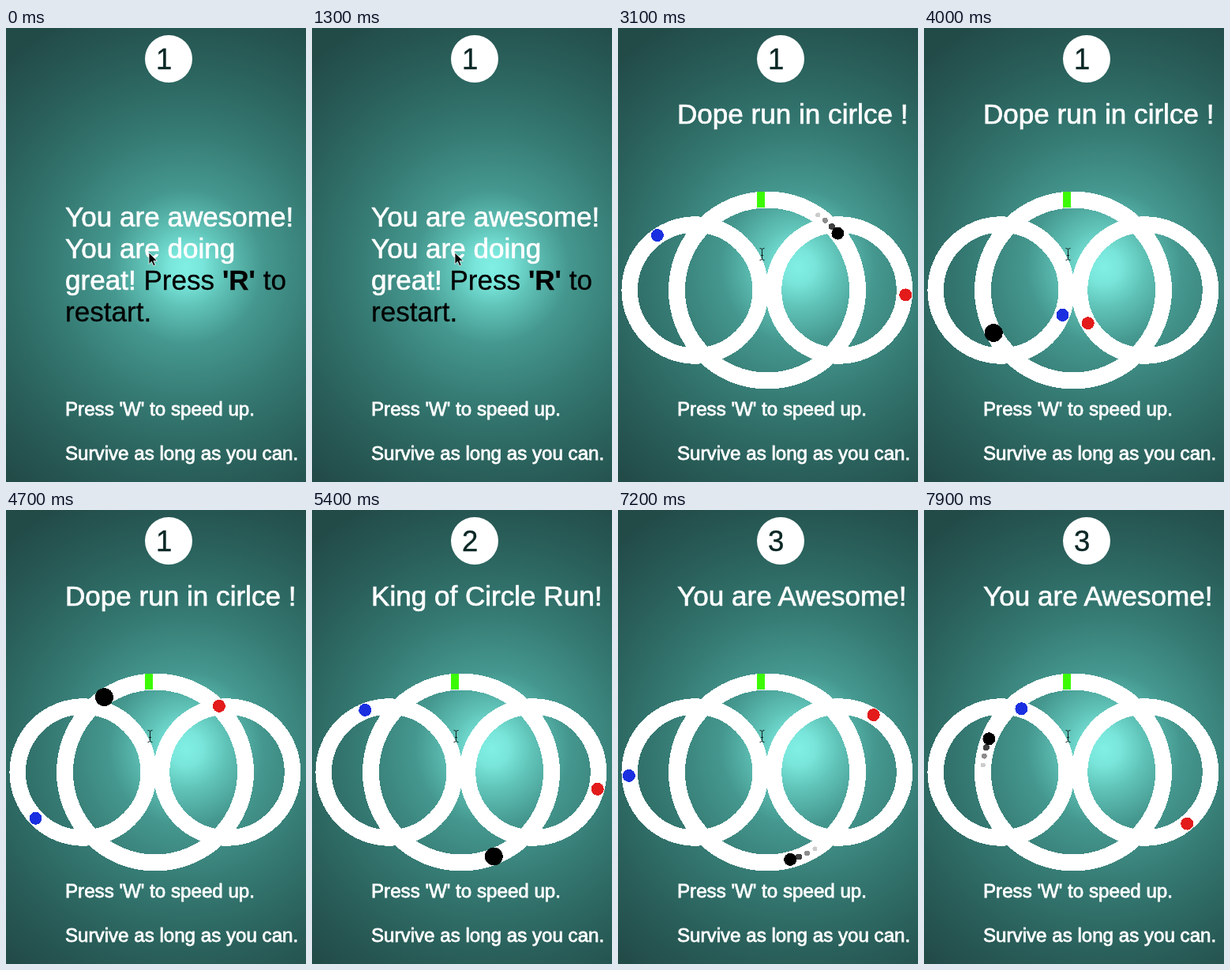
An HTML page that plays this animation: 380x574 px, repeating every 8 s.

```html
<!DOCTYPE html>
<html lang="en">
<head>
<meta charset="utf-8">
<title>Circle run</title>
<style>
  html, body { margin: 0; width: 100%; height: 100%; overflow: hidden; background: #224b48; }
  svg { display: block; width: 380px; height: 574px; }
  text { font-family: "Liberation Sans", Arial, sans-serif; fill: #fff; stroke: #fff; white-space: pre; }
  .big { font-size: 35.1px; stroke-width: .7px; }
  .hint { font-size: 24.15px; stroke-width: .8px; }
  .dark { fill: #000; stroke: #000; stroke-width: .3px; }
  #count { font-size: 36.5px; fill: #0c2826; stroke: #0c2826; stroke-width: .4px; }
  .ring { fill: none; stroke: #fff; }
  #game { shape-rendering: crispEdges; }
</style>
</head>
<body>
<svg viewBox="0 0 380 574">
  <defs>
    <radialGradient id="glow" gradientUnits="userSpaceOnUse" cx="228" cy="302" r="345">
      <stop offset="0" stop-color="#80efe4"/>
      <stop offset=".06" stop-color="#7ae6db"/>
      <stop offset=".14" stop-color="#62c6bb"/>
      <stop offset=".28" stop-color="#45988f"/>
      <stop offset=".5" stop-color="#357a73"/>
      <stop offset=".75" stop-color="#2a605b"/>
      <stop offset="1" stop-color="#224b48"/>
    </radialGradient>
  </defs>
  <rect width="380" height="574" fill="url(#glow)"/>
  <circle cx="206" cy="39" r="30" fill="#fff"/>
  <text id="count" x="190" y="51.5"></text>
  <text class="hint" x="75" y="490">Press 'W' to speed up.</text>
  <text class="hint" x="75" y="546">Survive as long as you can.</text>

  <g id="over">
    <text class="big" x="75" y="251">You are awesome!</text>
    <text class="big" x="75" y="291">You are doing</text>
    <text class="big" x="75" y="331">great! <tspan class="dark">Press <tspan font-weight="bold">'R'</tspan> to</tspan></text>
    <text class="big dark" x="75" y="371">restart.</text>
    <path d="M181 284v14.5l3.4-3.2 2.4 5.4 2.4-1-2.3-5.3h4.6z" fill="#000" stroke="#fff" stroke-width=".8"/>
  </g>

  <g id="game">
    <text id="title" class="big" x="75" y="121"></text>
    <circle class="ring" cx="97.7" cy="331.5" r="83" stroke-width="20.5"/>
    <circle class="ring" cx="280" cy="331.5" r="83" stroke-width="20.5"/>
    <circle class="ring" cx="189" cy="331.5" r="114.5" stroke-width="21"/>
    <rect x="176" y="207" width="10" height="20" fill="#3cfa05"/>
    <g id="trail">
      <circle r="4" opacity=".75"/>
      <circle r="3.4" opacity=".45"/>
      <circle r="3" opacity=".2"/>
    </g>
    <circle id="runner"/>
    <circle id="blue" r="8" fill="#1a30e0"/>
    <circle id="red" r="8" fill="#e31b1b"/>
    <path d="M179.5 278.5q3 0 3 2v11q0 2-3 2M185.5 278.5q-3 0-3 2v11q0 2 3 2M181 287.5h3" fill="none" stroke="#10211f" shape-rendering="auto"/>
  </g>
</svg>
<script>
const LOOP = 8000, STEP = 100, START = 1500;
const TITLES = ["Do you even die!", "Dope run in cirlce !", "King of Circle Run!", "You are Awesome!"];

// Speeds in degrees per second; each sprint is [start, length] in ms.
const WALK = 120, RUN = 326;
const SPRINTS = [[2970, 530], [4750, 530], [5950, 330], [6800, 560], [7855, 145]];

const el = id => document.getElementById(id);
const show = (node, on) => { node.style.display = on ? "" : "none"; };
const place = (node, cx, radius, degrees) => {
  const a = degrees * Math.PI / 180;
  node.setAttribute("cx", cx + radius * Math.cos(a));
  node.setAttribute("cy", 331.2 + radius * Math.sin(a));
};

const sprintTime = t => SPRINTS.reduce(
  (sum, [start, length]) => sum + Math.min(Math.max(t - start, 0), length), 0);
const runnerAngle = t =>
  102.5 + (WALK * (t - START) + (RUN - WALK) * sprintTime(t)) / 1000;

// The obstacles orbit at a speed that falls off very slightly.
const orbit = (t, phase, speed) => {
  const s = (t - START) / 1000;
  return phase + speed * s * (1 - s / 290);
};

function draw(t) {
  const playing = t >= START;
  const angle = runnerAngle(t);
  const laps = playing ? Math.floor((angle + 90) / 360) : 1;
  const sprinting = SPRINTS.some(([start, length]) => t >= start && t < start + length);

  show(el("game"), playing);
  show(el("over"), !playing);
  show(el("trail"), sprinting);
  el("count").textContent = laps;
  el("title").textContent = TITLES[laps];
  el("runner").setAttribute("r", sprinting ? 8 : 11.5);
  place(el("runner"), 189, 114.5, angle);
  [...el("trail").children].forEach((dot, i) => place(dot, 189, 114.5, angle - 5.7 * (i + 1)));
  place(el("blue"), 97.7, 84, orbit(t, -28, 165.5));
  place(el("red"), 280.5, 84, orbit(t, 102.8, 164.3));
}

const origin = performance.now();
function tick() {
  const t = (performance.now() - origin) % LOOP;
  draw(Math.floor(t / STEP) * STEP);
  requestAnimationFrame(tick);
}
tick();
</script>
</body>
</html>
```
